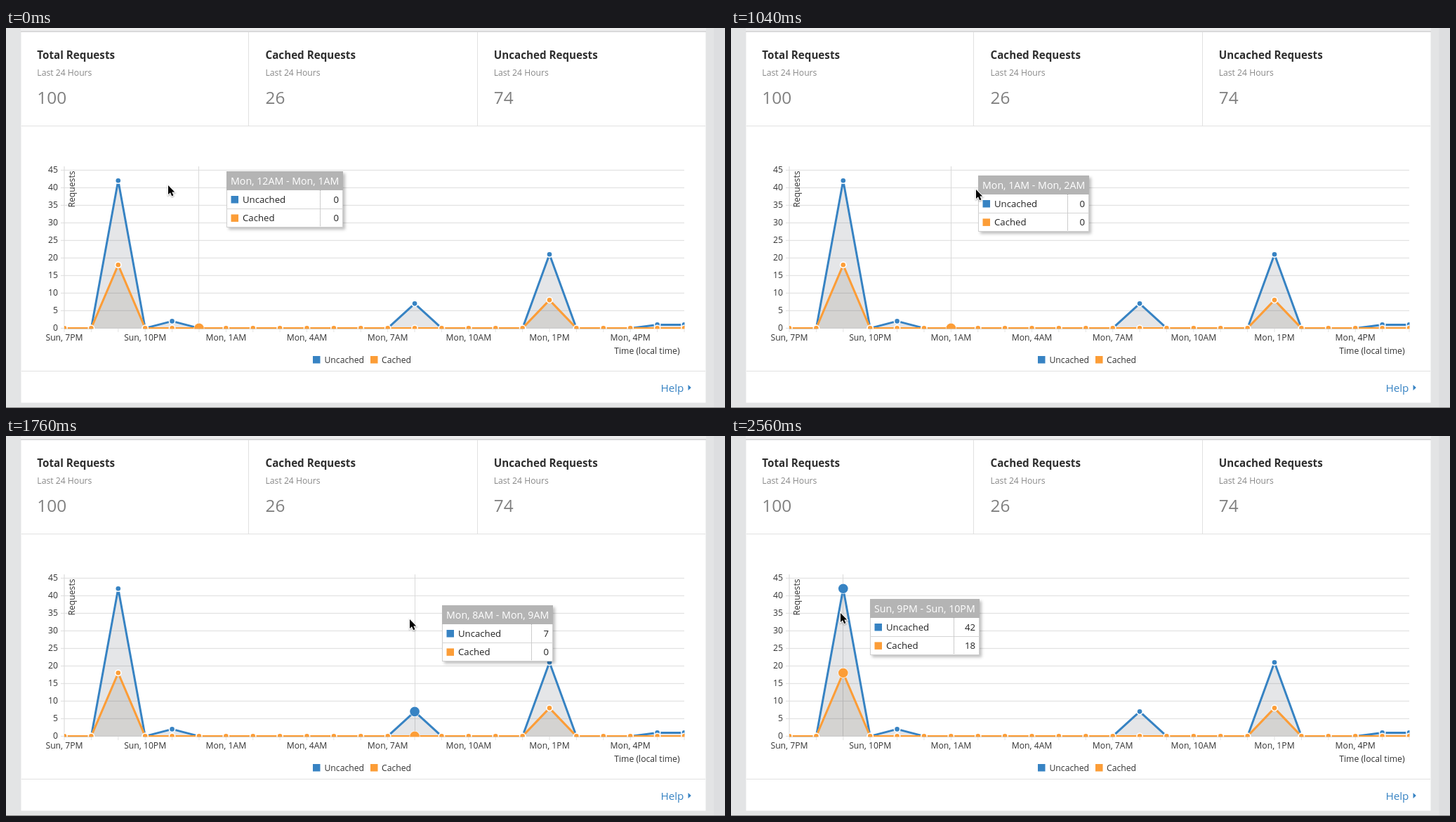
These frames come from a looping animation (1024 px wide and 541 px high, 2.64 s). An HTML page with a canvas:

```html
<!DOCTYPE html>
<html lang="en">
<head>
<meta charset="utf-8">
<title>Requests</title>
<style>
html, body { margin: 0; width: 100%; height: 100%; overflow: hidden; background: #e3e4e5; }
canvas { display: block; }
</style>
</head>
<body>
<canvas id="stage" width="1024" height="541"></canvas>
<script>
const ctx = document.getElementById('stage').getContext('2d');
const LOOP = 2640, STEP = 80;
const BLUE = '#3783c3', ORANGE = '#fc9d37', GRID = '#e3e3e3', INK = '#333';
const X0 = 83, DX = 38.39, Y0 = 427.4, DY = 5.005, LAST = 23;

const series = spikes => Array.from({ length: LAST + 1 }, (_, i) => spikes[i] || 0);
const uncached = series({ 2: 42, 4: 2, 13: 7, 18: 21, 22: 1, 23: 1 });
const cached = series({ 2: 18, 18: 8 });

// Pointer path: time, x, y
const path = [
  [-160, 306, 221], [-80, 270, 222], [0, 231, 224], [240, 167, 229], [480, 147, 232],
  [720, 153, 233], [1040, 349, 230], [1360, 528, 252], [1560, 582, 259],
  [1760, 575, 261], [1960, 365, 255], [2160, 185, 251], [2320, 152, 251], [2560, 156, 252]
];

const px = i => X0 + i * DX;
const py = v => Y0 - v * DY;

function rect(x, y, w, h, color) {
  ctx.fillStyle = color;
  ctx.fillRect(x, y, w, h);
}

function text(str, x, y, size, color = INK, align = 'left', weight = 400) {
  ctx.font = `${weight} ${size}px "Open Sans", "Noto Sans", sans-serif`;
  ctx.textAlign = align;
  ctx.fillStyle = color;
  ctx.fillText(str, x, y);
}

function dot(x, y, r, color) {
  ctx.fillStyle = color;
  ctx.beginPath();
  ctx.arc(x, y, r, 0, Math.PI * 2);
  ctx.fill();
}

function polygon(points, color) {
  ctx.beginPath();
  points.forEach(([x, y]) => ctx.lineTo(x, y));
  ctx.closePath();
  ctx.fillStyle = color;
  ctx.fill();
}

function hour(i) {
  const h = (19 + i) % 24;
  return `${i < 5 ? 'Sun' : 'Mon'}, ${h % 12 || 12}${h < 12 ? 'AM' : 'PM'}`;
}

// Cubic Hermite through the path points
function pointerAt(t) {
  let k = 1;
  while (k < path.length - 2 && t > path[k + 1][0]) k++;
  const a = path[k - 1], b = path[k], c = path[k + 1], d = path[k + 2] || c;
  const span = c[0] - b[0], u = (t - b[0]) / span;
  return [1, 2].map(n => {
    const m0 = (c[n] - a[n]) / (c[0] - a[0]) * span;
    const m1 = (d[n] - b[n]) / (d[0] - b[0]) * span;
    return (2 * u ** 3 - 3 * u * u + 1) * b[n] + (u ** 3 - 2 * u * u + u) * m0
      + (3 * u * u - 2 * u ** 3) * c[n] + (u ** 3 - u * u) * m1;
  });
}

function page() {
  rect(0, 0, 1024, 541, '#e3e4e5');
  rect(1008, 0, 16, 541, '#dddee0');
  rect(21, 0, 976, 4, '#ededee');
  rect(21, 4, 976, 2, '#d9d9da');
  rect(21.5, 6, 975, 527.5, '#fff');
  rect(0, 540, 1024, 1, '#858585');
  rect(345, 6, 1, 133, '#e1e1e1');
  rect(671, 6, 1, 133, '#e1e1e1');
  rect(22, 139, 974, 1, '#e1e1e1');
  rect(22, 488, 974, 1, '#e1e1e1');
  [['Total', 100], ['Cached', 26], ['Uncached', 74]].forEach(([name, n], i) => {
    const x = 44.3 + i * 325.2;
    text(name + ' Requests', x, 44, 15.2, '#2f2f2f', 'left', 700);
    text('Last 24 Hours', x, 67.5, 12.2, '#888');
    text(n, x, 108.3, 24.4, '#808080');
  });
  text('Help', 932.5, 517.5, 15.2, '#3783c3');
  polygon([[971.5, 508], [975.8, 512], [971.5, 516]], '#3783c3');
}

function axes(active) {
  for (let v = 0; v <= 45; v += 5) {
    rect(78, Math.round(py(v)) - 0.2, 888, 1.3, GRID);
    text(v, 74, py(v) + 3.8, 12.2, INK, 'right');
  }
  rect(82.4, 197, 1.2, 231, '#dcdcdc');
  for (let i = 0; i <= LAST; i++) {
    rect(px(i) - 0.5, 428, 1, 5, GRID);
    if (i % 3 === 0 && i < 22) text(hour(i), px(i), 445, 12.2, INK, 'center');
  }
  rect(Math.floor(px(active)), 197, 1, 231, '#d9d9d9');
  ctx.save();
  ctx.translate(98, 203.5);
  ctx.rotate(-Math.PI / 2);
  text('Requests', 0, 0, 12.2, INK, 'right');
  ctx.restore();
  text('Time (local time)', 959.5, 464, 12.2, INK, 'right');
  rect(437, 467, 10.5, 10.5, BLUE);
  text('Uncached', 453.5, 476.7, 12.2);
  rect(519, 467, 10.5, 10.5, ORANGE);
  text('Cached', 535, 476.7, 12.2);
}

function plot(data, color, shade, active) {
  const points = data.map((v, i) => [px(i), py(v)]);
  polygon([[X0, Y0], ...points, [px(LAST), Y0]], shade);
  ctx.beginPath();
  points.forEach(([x, y]) => ctx.lineTo(x, y));
  ctx.strokeStyle = color;
  ctx.lineWidth = 3;
  ctx.lineJoin = 'round';
  ctx.stroke();
  points.forEach(([x, y], i) => {
    const big = i === active;
    dot(x, y, big ? 7.5 : 4.9, '#fff');
    dot(x, y, big ? 6.8 : 3.3, color);
  });
}

function tooltip(i, y) {
  const title = `${hour(i)} - ${hour(i + 1)}`;
  ctx.font = '400 14.2px "Open Sans", "Noto Sans", sans-serif';
  const x = Math.round(px(i) + 38.7);
  const w = Math.round(ctx.measureText(title).width + 12);
  const split = Math.round(x + w * (uncached[i] > 9 ? 0.762 : 0.804));
  ctx.save();
  ctx.shadowColor = 'rgba(0,0,0,.25)';
  ctx.shadowBlur = 4;
  ctx.shadowOffsetX = ctx.shadowOffsetY = 3;
  rect(x, y, w, 80, '#fff');
  ctx.restore();
  ctx.strokeStyle = '#cfcfcf';
  ctx.lineWidth = 1;
  ctx.strokeRect(x + 0.5, y + 0.5, w - 1, 79);
  rect(x, y, w, 27, '#b4b4b4');
  text(title, x + 6, y + 19, 14.2, '#fff');
  rect(x, y + 53, w, 1, '#d5d5d5');
  ctx.strokeStyle = '#999';
  ctx.setLineDash([1, 1]);
  ctx.beginPath();
  ctx.moveTo(split + 0.5, y + 27);
  ctx.lineTo(split + 0.5, y + 79);
  ctx.stroke();
  ctx.setLineDash([]);
  [['Uncached', uncached, BLUE], ['Cached', cached, ORANGE]].forEach(([name, data, color], row) => {
    const base = y + 45 + row * 26.4;
    rect(x + 6.5, base - 10, 10.5, 10.5, color);
    text(name, x + 23, base, 13.2, '#222');
    text(data[i], x + w - 6, base, 13.2, '#222', 'right');
  });
}

function pointer(x, y) {
  ctx.save();
  ctx.translate(x, y);
  ctx.beginPath();
  [[0, 0], [0, 13], [3, 10.3], [5.2, 15.3], [7.5, 14.3], [5.3, 9.5], [9.2, 9.5]]
    .forEach(([a, b]) => ctx.lineTo(a, b));
  ctx.closePath();
  ctx.shadowColor = 'rgba(0,0,0,.35)';
  ctx.shadowBlur = 2;
  ctx.shadowOffsetY = 1;
  ctx.strokeStyle = '#fff';
  ctx.lineWidth = 2;
  ctx.stroke();
  ctx.shadowColor = 'transparent';
  ctx.fillStyle = '#000';
  ctx.fill();
  ctx.restore();
}

function draw(t) {
  const [x, y] = pointerAt(t);
  // The chart reacts one step behind the pointer
  const active = Math.round((pointerAt(t - STEP)[0] - X0) / DX);
  page();
  axes(active);
  ctx.save();
  ctx.beginPath();
  ctx.rect(X0, 190, px(LAST) - X0 + 0.5, 238.3);
  ctx.clip();
  plot(uncached, BLUE, 'rgba(70,80,90,.14)', active);
  plot(cached, ORANGE, 'rgba(110,90,70,.14)', active);
  ctx.restore();
  tooltip(active, Math.round(y - 20.3));
  pointer(x, y);
}

function tick() {
  const t = performance.now() % LOOP;
  draw(Math.floor(t / STEP) * STEP);
  requestAnimationFrame(tick);
}
tick();
</script>
</body>
</html>
```
